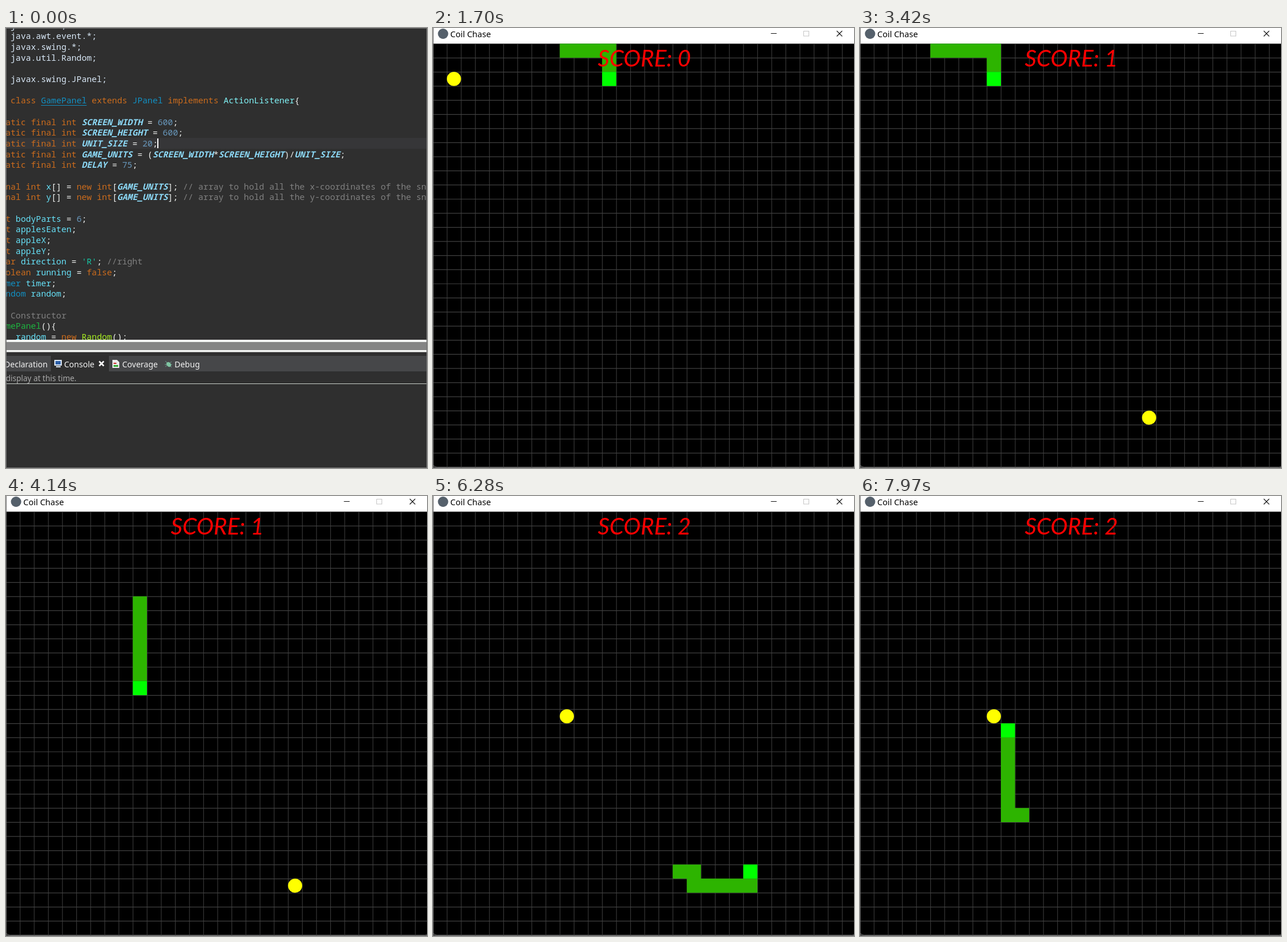
Write an HTML page that moves like this. It is 732 by 765 pixels and loops after 8000 ms.

```html
<!DOCTYPE html>
<html lang="en">
<head>
<meta charset="utf-8">
<title>Coil Chase</title>
<style>
  html, body { margin: 0; width: 100%; height: 100%; overflow: hidden; background: #2f2f2f; }
  #stage { position: relative; width: 100%; height: 100%; overflow: hidden; contain: strict; }
  .row { position: absolute; left: 0; top: 191px; width: 100%; height: 19px; background: #363638; }
  #caret { position: absolute; left: 263px; top: 192px; width: 2px; height: 17px; background: #fff; }
  pre {
    position: absolute; left: -.8px; top: -14.2px; margin: 0; color: #f0f2f0;
    font: 14.7px/18.66px "Noto Sans Mono", monospace;
  }
  .imp { color: #d9e8f7 } .note { color: #808080 } .str { color: #17c6a3 } .key { color: #cc6c1d }
  .fixed { color: #8ddaf8; font-weight: bold; font-style: italic }
  .num { color: #6897bb } .type, .self { color: #1290c3 } .face { color: #80f2f6 }
  .self { text-decoration: underline; text-underline-offset: 3px }
  .method { color: #1eb540 } .make { color: #a7ec21 } .field { color: #66e1f8 }
  svg { position: absolute; left: 0; top: 0; display: block; width: 100%; height: 100%; }
  svg text { font-family: "Noto Sans", sans-serif; }
  .tabs { font-size: 14px; fill: #f2f2f2; }
  #status { font-size: 13.5px; fill: #a9a9a9; }
  #score { font: italic 40px Lato, sans-serif; fill: #f00; text-anchor: middle; }
</style>
</head>
<body>
<div id="stage">
<div class="row"></div>
<div id="caret"></div>
<pre id="code"> java.awt.*;
 java.awt.event.*;
 javax.swing.*;
 java.util.Random;

 javax.swing.JPanel;

 class GamePanel extends JPanel implements ActionListener{

atic final int SCREEN_WIDTH = 600;
atic final int SCREEN_HEIGHT = 600;
atic final int UNIT_SIZE = 20;
atic final int GAME_UNITS = (SCREEN_WIDTH*SCREEN_HEIGHT)/UNIT_SIZE;
atic final int DELAY = 75;

nal int x[] = new int[GAME_UNITS]; // array to hold all the x-coordinates of the snake
nal int y[] = new int[GAME_UNITS]; // array to hold all the y-coordinates of the snake

t bodyParts = 6;
t applesEaten;
t appleX;
t appleY;
ar direction = 'R'; //right
olean running = false;
mer timer;
ndom random;

 Constructor
mePanel(){
  random = new Random();</pre>

<svg viewBox="0 0 732 765">
  <!-- console pane -->
  <path fill="#2f2f2f" d="M0 542h732v223H0z"/>
  <path fill="#f5f7f5" d="M0 542h732v21.500H0z"/>
  <path fill="#858585" d="M0 546h732v14H0z"/>
  <path fill="#464749" d="M0 570h732v27H0z"/>
  <path fill="#2f2f2f" d="M78 569h101v28H78z"/>
  <path fill="#c9cfc9" d="M0 618h732v1H0z"/>
  <g class="tabs">
    <text x="72.5" y="590" text-anchor="end">Declaration</text>
    <text x="101" y="590">Console</text>
    <text x="202" y="590">Coverage</text>
    <text x="293" y="590">Debug</text>
  </g>
  <path d="M162 579.500l8 8m0-8l-8 8" stroke="#fff" stroke-width="2.500"/>
  <path fill="#dfe9f5" d="M84 577h13v10H84zM87 588h8v2h-8z"/>
  <path fill="#2d5fa8" d="M86 579h9v6h-9z"/>
  <path fill="#ececec" d="M185 577h8l4 4v10h-12z"/>
  <path fill="#c33" d="M187 582h5v2h-5z"/>
  <path fill="#3a3" d="M187 586h8v3h-8z"/>
  <path d="M277 579l11 11m0-10l-11 9m-1-4h13" stroke="#6f9a8d"/>
  <ellipse cx="283" cy="585" rx="3.500" ry="4.500" fill="#7fc5a2" transform="rotate(-40 283 585)"/>
  <text id="status" y="614"></text>
  <path d="M0 .5h731.500V765" fill="none" stroke="#707070"/>

  <g id="game">
    <path d="M-.4-3H735.800V755.400q0 8-8 8H7.600q-8 0-8-8z" fill="#000" stroke="#666"/>
    <path d="M-.4-3H735.800V27H-.4z" fill="#fff"/>
    <circle cx="17.500" cy="10" r="9" fill="#55606b"/>
    <text x="30" y="15.500" font-size="14.500">Coil Chase</text>
    <g fill="none" stroke="#111" stroke-width="1.100">
      <path d="M587.500 9.500h10M702 5l9.500 9.500m0-9.500l-9.500 9.500"/>
      <path d="M644.500 5.500h9v8.500h-9z" stroke="#c8c8c8"/>
    </g>
    <g transform="translate(-.4 27.200) scale(24.540)">
      <g stroke-width=".05">
        <path id="columns" stroke="#353535"/>
        <path id="rows" stroke="#404040"/>
      </g>
      <circle id="apple" r=".5" fill="#ff0"/>
      <path id="body" fill="none" stroke="#2db400" stroke-linecap="square"/>
      <rect id="head" width="1" height="1" fill="#0f0"/>
    </g>
    <text id="score" x="367.500" y="67"></text>
  </g>
  <path d="M.5 0v764.500H732" fill="none" stroke="#707070"/>
</svg>
</div>

<script>
const $ = id => document.getElementById(id);
const set = (id, attrs) => Object.entries(attrs).forEach(([k, v]) => $(id).setAttribute(k, v));

// Syntax colouring
const tokens = new RegExp([
  '(?<imp> javax?\\.\\S+;)', "(?<note>//.*| Constructor)", "(?<str>'R')",
  '(?<key>\\b(?:class|extends|implements|atic|nal|final|int|new|t|ar|olean|false)\\b)',
  '(?<fixed>\\b(?:[A-Z]+_[A-Z]+|DELAY)\\b)', '(?<num>\\b\\d+\\b)',
  '(?<type>\\b(?:JPanel|mer|ndom)\\b)', '(?<self>\\bGamePanel\\b)',
  '(?<face>ActionListener)', '(?<method>mePanel)', '(?<make>Random)',
  '(?<field>\\b[a-z]\\w*\\b)'
].join('|'), 'g');
$('code').innerHTML = $('code').textContent.replace(tokens, (word, ...rest) => {
  const groups = rest.at(-1);
  const kind = Object.keys(groups).find(k => groups[k]);
  return `<span class="${kind}">${word}</span>`;
});

const lineStarts = Array.from({ length: 30 }, (_, i) => i + .015);
set('columns', { d: lineStarts.slice(1).map(x => `M${x} 0v30`).join('') });
set('rows', { d: lineStarts.map(y => `M0 ${y}h30`).join('') });

// Head cells visited, one per game tick
const dirs = { r: [1, 0], l: [-1, 0], d: [0, 1], u: [0, -1] };
const trail = [[0, 0]];
for (const run of 'r12 d2 l11 u2 r8 d25 r9 d1 r4 u5 l12 u6'.split(' ')) {
  const [dx, dy] = dirs[run[0]];
  for (let n = +run.slice(1); n--;) {
    const [x, y] = trail.at(-1);
    trail.push([x + dx, y + dy]);
  }
}

const apples = [[1, 2], [20, 26], [9, 14]];
const eatenAt = apples.slice(0, 2).map(([ax, ay]) => trail.findIndex(([x, y]) => x === ax && y === ay));

// Screen refreshes: [start, count], 120 ms apart
const refreshes = [
  [810, 1], [970, 1], [1320, 1], [1560, 1], [1700, 4], [2210, 4], [2710, 1], [3030, 1],
  [3180, 7], [4020, 5], [4640, 1], [4780, 2], [5050, 7], [5890, 2], [6160, 2],
  [6490, 5], [7100, 1], [7250, 7]
].flatMap(([start, count]) => Array.from({ length: count }, (_, i) => start + i * 120));

const LOOP = 8000, LAUNCH = 280, OPEN = 810, SETTLED = 970;

function drawGame(t) {
  const shown = refreshes.findLast(r => r <= t);
  const step = Math.min(trail.length - 1, Math.round(9.45 + (shown - 1320) / 75.95));
  const score = eatenAt.filter(s => step >= s).length;
  const cells = trail.slice(Math.max(0, step - 5 - score), step);
  const [hx, hy] = trail[step], [ax, ay] = apples[score];
  set('body', { d: 'M' + cells.map(([x, y]) => `${x + .5} ${y + .5}`).join('L') });
  set('head', { x: hx, y: hy });
  set('apple', { cx: ax + .5, cy: ay + .5 });
  set('game', { transform: t < SETTLED ? 'translate(3.4 3.7) scale(.988)' : '' });
  $('score').textContent = 'SCORE: ' + score;
}

function draw(t) {
  const launched = t >= LAUNCH;
  $('caret').style.display = launched ? 'none' : '';
  set('status', launched ? { x: 0, 'text-anchor': 'start' } : { x: 122.5, 'text-anchor': 'end' });
  $('status').textContent = launched
    ? '[Java Application] C:\\Program Files\\Java\\jdk-15\\bin\\javaw.exe'
    : 'display at this time.';
  $('game').style.display = t < OPEN ? 'none' : '';
  if (t >= OPEN) drawGame(t);
}

const start = performance.now();
function tick() {
  draw((performance.now() - start) % LOOP);
  requestAnimationFrame(tick);
}
tick();
</script>
</body>
</html>
```
